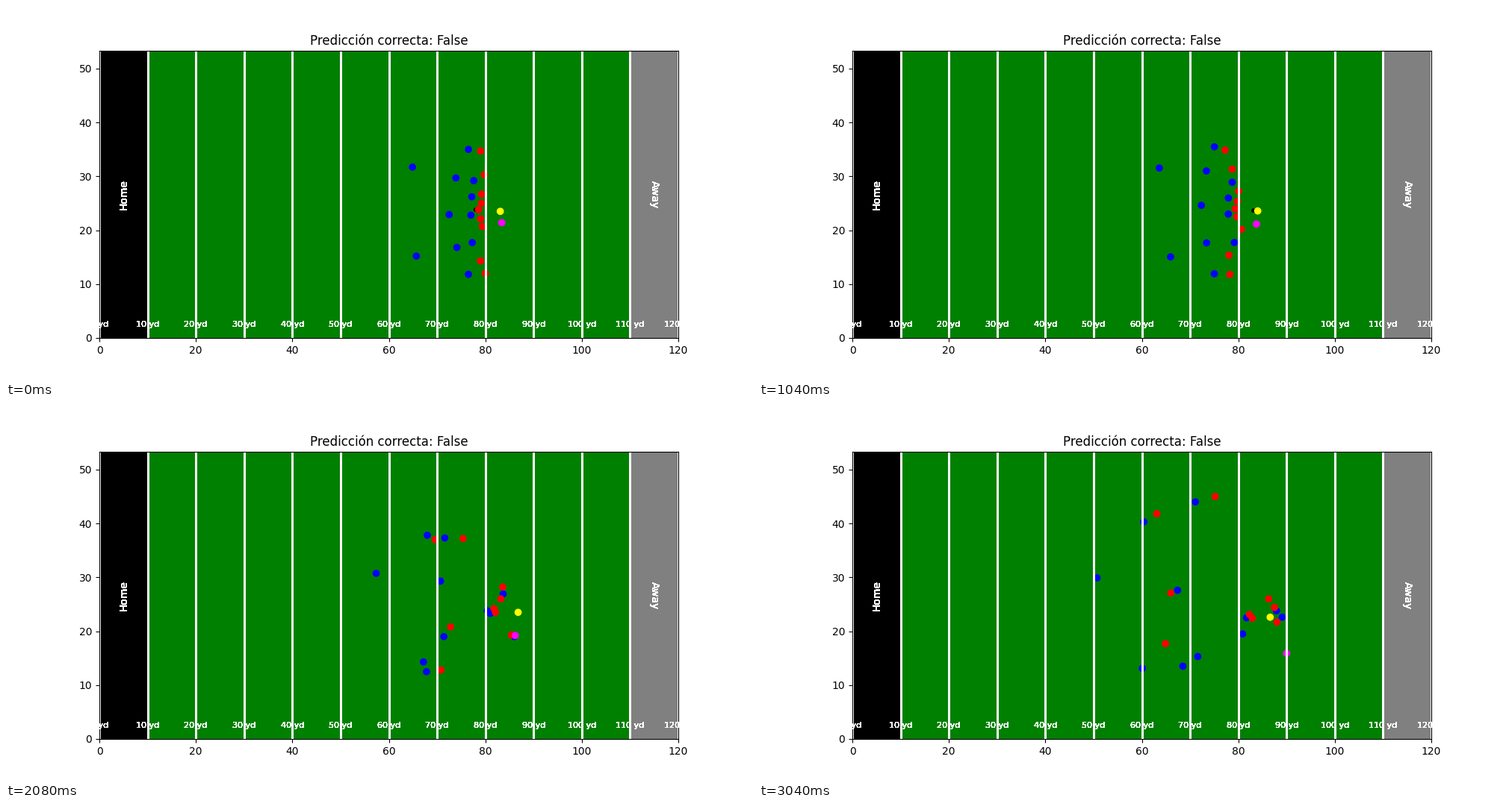
Animation, 1000 px wide and 500 px high, one loop 3.12 s. Source, as a matplotlib script:

```python
import numpy as np
import matplotlib.pyplot as plt
from matplotlib.animation import FuncAnimation

FRAMES, INTERVAL = 39, 80
LENGTH, WIDTH = 120, 53.3
SNAP, CATCH = 8, 14

fig, ax = plt.subplots(figsize=(10, 5), dpi=100)


def speed_up(frame):
    """Smooth ramp: at rest before the snap, then steady running."""
    return np.logaddexp(0, (frame - 12.5) / 3)


def progress(frame):
    first, last = speed_up(0), speed_up(FRAMES - 1)
    return (speed_up(frame) - first) / (last - first)


HALFWAY = progress(26)


class Player:
    """Runs from start to end, bent so that it passes via halfway."""

    def __init__(self, color, start, end, via=None):
        self.color = color
        self.start = np.array(start)
        self.run = np.array(end) - self.start
        self.bend = np.zeros(2)
        if via:
            off = np.array(via) - self.start - HALFWAY * self.run
            self.bend = off / (HALFWAY * (1 - HALFWAY))

    def at(self, frame):
        s = progress(frame)
        return self.start + s * self.run + s * (1 - s) * self.bend


center = Player("red", (78.6, 23.8), (82.3, 23.1), via=(81.8, 24.2))
passer = Player("yellow", (83.1, 23.5), (86.6, 22.6), via=(86.8, 23.5))

players = [
    # defense
    Player("blue", (76.5, 35.0), (60.4, 40.3)),
    Player("blue", (64.9, 31.7), (50.7, 29.9)),
    Player("blue", (65.7, 15.2), (68.5, 13.5)),
    Player("blue", (76.5, 11.8), (60.1, 13.1)),
    Player("blue", (73.9, 29.7), (71.1, 44.0), via=(71.6, 37.3)),
    Player("blue", (77.6, 29.2), (87.9, 23.8), via=(83.7, 26.9)),
    Player("blue", (77.2, 26.2), (80.9, 19.5), via=(80.4, 23.8)),
    Player("blue", (72.5, 22.9), (67.4, 27.6), via=(70.7, 29.3)),
    Player("blue", (77.0, 22.8), (81.7, 22.5), via=(81.0, 23.3)),
    Player("blue", (77.3, 17.7), (89.1, 22.6), via=(86.0, 19.0)),
    Player("blue", (74.1, 16.8), (71.6, 15.3), via=(71.4, 19.0)),
    # receivers
    Player("red", (79.0, 34.7), (63.1, 41.8), via=(69.6, 37.0)),
    Player("red", (79.8, 30.3), (75.2, 45.0), via=(75.4, 37.2)),
    Player("red", (79.0, 14.3), (66.0, 27.1), via=(72.8, 20.8)),
    Player("red", (80.0, 12.0), (64.9, 17.7), via=(70.8, 12.8)),
    # line
    Player("red", (79.2, 26.7), (86.3, 26.0), via=(83.6, 28.2)),
    Player("red", (79.2, 25.0), (87.5, 24.4), via=(83.2, 26.0)),
    center,
    Player("red", (79.0, 22.1), (82.9, 22.4), via=(82.1, 23.5)),
    Player("red", (79.4, 20.7), (88.0, 21.7), via=(85.4, 19.3)),
    # backfield
    passer,
    Player("magenta", (83.4, 21.4), (90.0, 15.9), via=(86.2, 19.2)),
]


def ball_at(frame):
    """The ball lies by the center, then flies back to the passer."""
    t = np.clip((frame - SNAP) / (CATCH - SNAP), 0, 1)
    spot = center.at(frame) - (0.6, 0)
    return spot + t * (passer.at(frame) - spot)


def positions(frame):
    return [ball_at(frame)] + [p.at(frame) for p in players]


def label(x, y, s, size, angle=0):
    ax.text(x, y, s, color="white", fontsize=size, rotation=angle,
            ha="center", va="center")


def draw_markings():
    for yard in range(0, LENGTH + 1, 10):
        ax.axvline(yard, color="white", lw=2)
        label(yard, 2.5, f"{yard} yd", 8)
    label(5, WIDTH / 2, "Home", 10, 90)
    label(115, WIDTH / 2, "Away", 10, 270)


ax.set(xlim=(0, LENGTH), ylim=(0, WIDTH), facecolor="green",
       title="Predicción correcta: False")
ax.axvspan(0, 10, color="black", lw=0)
ax.axvspan(110, 120, color="gray", lw=0)
for _ in range(16):  # stacked copies harden the antialiased edges
    draw_markings()

dots = ax.scatter(*np.transpose(positions(0)), s=[10] + [36] * len(players),
                  c=["black"] + [p.color for p in players])


def update(frame):
    dots.set_offsets(positions(frame))
    return (dots,)


anim = FuncAnimation(fig, update, frames=FRAMES, interval=INTERVAL,
                     repeat=True, repeat_delay=0)
plt.show()
```
